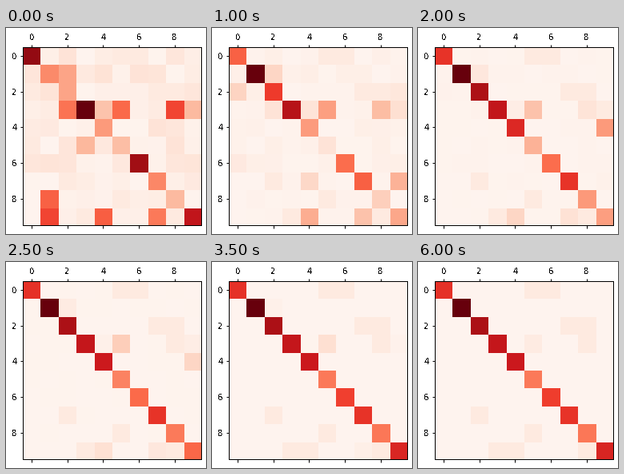
A matplotlib script for the animation above (7500 ms loop, 250 by 258 pixels).

```python
import numpy as np
import matplotlib.pyplot as plt
from matplotlib.animation import FuncAnimation

W, H, DPI = 250, 258, 100
LEFT, TOP, SIDE = 21, 24, 223
PX = 72 / DPI  # points per pixel
N = 10
STEPS = 15
CHANGES = (0, 1, 2, 3, 4, 5, 6, 7, 9, 11)  # steps at which the matrix is updated

# diagonal in percent: before training, early, final, and the step of the rise
UNTRAINED = np.array([91, 40, 32, 100, 35, 24, 88, 41, 25, 78])
EARLY = np.array([51, 100, 34, 82, 33, 10, 49, 18, 18, 31])
FINAL = np.array([66, 100, 85, 77, 75, 45, 62, 65, 46, 70])
RISE = np.array([3, 1, 1.9, 3, 3.3, 4, 6, 1.6, 3.8, 5])

# confusions that fade away: row, column, start, decay rate
FADING = [(1, 2, .32, .35), (3, 2, .47, .75), (3, 4, .22, .4), (3, 5, .5, .2),
          (3, 8, .6, .45), (3, 9, .25, .35), (5, 3, .26, 1.5), (8, 1, .52, 4),
          (9, 1, .6, 4), (9, 4, .53, .3), (9, 7, .45, .35)]
# confusions that come and go: row, column, height, step of the peak
PASSING = [(6, 0, .12, 1), (2, 9, .17, 1), (2, 0, .14, 2), (7, 4, .14, 2),
           (7, 9, .25, 2), (4, 9, .34, 4)]
# faint confusions that stay
LASTING = [(0, 5), (0, 6), (2, 7), (2, 8), (3, 8), (7, 2), (8, 5), (9, 3),
           (9, 4), (9, 8)]

noise = 0.1 * np.random.default_rng(4).random((N, N)) ** 2


def matrix(step):
    """Confusion matrix after the given training step."""
    m = 0.01 + noise * np.exp(-0.6 * step)
    for r, c in LASTING:
        m[r, c] = 0.065
    for r, c, start, rate in FADING:
        m[r, c] = max(m[r, c], start * np.exp(-rate * step))
    for r, c, height, peak in PASSING:
        m[r, c] += height * np.exp(-((step - peak) / 1.1) ** 2)
    if step == 0:
        diag = UNTRAINED
    else:
        diag = EARLY + (FINAL - EARLY) / (1 + np.exp(-2.5 * (step - RISE)))
    np.fill_diagonal(m, diag / 100)
    return m


plt.rcParams["text.antialiased"] = False
fig = plt.figure(figsize=(W / DPI, H / DPI), dpi=DPI, facecolor="white")
ax = fig.add_axes([LEFT / W, 1 - (TOP + SIDE) / H, SIDE / W, SIDE / H])

# the image reaches one pixel under the right and bottom spines
low, high = -0.5, N - 0.5
edge = high + N / SIDE
image = ax.imshow(matrix(0), cmap="Reds", vmin=0, vmax=1, aspect="auto",
                  interpolation="nearest", extent=(low, edge, edge, low))
ax.set_xlim(low, high)
ax.set_ylim(high, low)
ax.set_xticks(range(0, N, 2))
ax.set_yticks(range(0, N, 2))
ax.tick_params(top=True, bottom=True, labeltop=True, labelbottom=False,
               length=3.5 * PX, width=PX, pad=3.5 * PX,
               labelsize=10 * PX, labelfontfamily="DejaVu Sans")
for spine in ax.spines.values():
    spine.set_linewidth(PX)


def draw(i):
    image.set_data(matrix(max(c for c in CHANGES if c <= i)))
    return [image]


anim = FuncAnimation(fig, draw, frames=STEPS, interval=500,
                     repeat=True, repeat_delay=0, blit=False)
plt.show()
```
